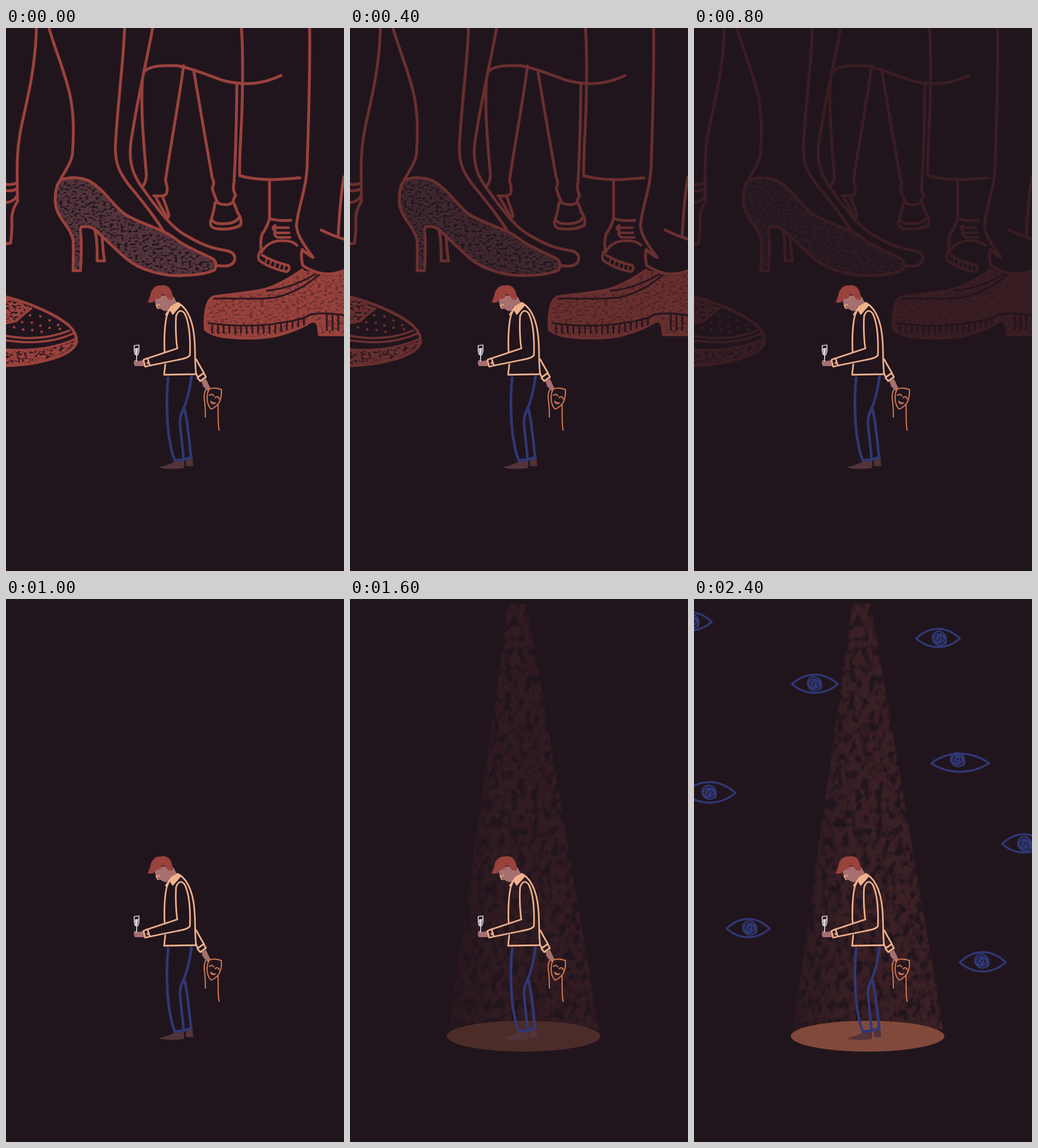
An HTML page that plays this animation: 590 px wide and 949 px high, repeating every 2800 ms.

```html
<!DOCTYPE html>
<html lang="en">
<head>
<meta charset="utf-8">
<title>Alone in the spotlight</title>
<style>
html, body { margin: 0; width: 100%; height: 100%; overflow: hidden; background: #21151d; }
svg { display: block; width: 100%; height: 100%; }
path, g { stroke-linecap: round; stroke-linejoin: round; }
.dark { fill: none; stroke: #2a171e; stroke-width: 3; }
.flat { stroke: none; }
</style>
</head>
<body>
<svg viewBox="0 0 590 949" fill="none">
  <defs>
    <filter id="grain" color-interpolation-filters="sRGB">
      <feTurbulence type="fractalNoise" baseFrequency=".16 .26" numOctaves="3" seed="4"/>
      <feColorMatrix values="0 0 0 0 0  0 0 0 0 0  0 0 0 0 0  6 0 0 0 -2"/>
      <feComposite in="SourceGraphic" operator="in"/>
    </filter>
    <filter id="haze" color-interpolation-filters="sRGB">
      <feTurbulence type="fractalNoise" baseFrequency=".085 .06" numOctaves="3" seed="9"/>
      <feColorMatrix values="0 0 0 0 0  0 0 0 0 0  0 0 0 0 0  4 0 0 0 -1.25" result="n"/>
      <feGaussianBlur in="SourceGraphic" stdDeviation="1.2"/>
      <feComposite in2="n" operator="in"/>
    </filter>
    <linearGradient id="beam">
      <stop offset="0" stop-color="#3a2025" stop-opacity=".5"/>
      <stop offset=".4" stop-color="#3a2025"/>
      <stop offset="1" stop-color="#3c2126"/>
    </linearGradient>
  </defs>

  <g id="crowd" stroke="#9a423c" stroke-width="5">
    <!-- left leg and boot -->
    <path d="M53 0C52 50 45 90 36 130C30 160 22 185 20 225Q19 250 20 303Q10 318 10 335Q11 355 8 376L0 377M0 273Q10 275 18 271M0 284Q10 286 19 281M0 305Q14 304 20 292"/>
    <path d="M75 0C85 35 100 70 110 110C120 150 118 190 116 220C114 235 103 250 95 265"/>
    <!-- second leg -->
    <path d="M207 0C205 60 195 130 191 205C190 240 200 255 215 275C240 305 260 330 278 360M256 0C245 60 228 130 218 200C213 240 225 262 240 282C260 310 285 345 310 360C335 375 355 385 385 389C400 392 402 402 397 410C390 418 380 416 366 415"/>
    <!-- high heel -->
    <path id="heel" class="flat" fill="#55353d" filter="url(#grain)" d="M95 266C110 260 130 260 145 267C175 285 185 310 210 327C240 345 275 350 300 372C320 385 345 395 362 404Q370 412 364 423C345 432 310 434 285 432C255 428 230 420 210 403C185 382 170 365 155 352Q145 345 131 348Q129 352 131 365Q132 395 130 424L117 424Q118 390 117 370C112 345 85 330 86 300Q86 275 95 266Z"/>
    <use href="#heel" id="heelLine"/>
    <path d="M155 354Q160 370 159 407L172 407Q169 390 168 366"/>
    <!-- skirt with two legs -->
    <path d="M240 78C250 65 275 65 300 66C330 72 350 82 380 92C420 102 450 97 480 83M238 92C235 140 240 200 245 255Q245 268 240 275M310 66C303 120 290 190 279 262C276 270 285 275 280 290Q275 295 258 293M274 296Q279 310 284 325Q285 332 281 331Q268 308 262 297"/>
    <path d="M328 76C337 130 350 205 360 262Q365 270 360 280Q366 300 370 306Q385 312 396 305Q398 295 401 293Q395 282 398 270Q402 200 403 96M365 305Q362 325 357 338Q355 350 370 351Q395 353 409 345Q413 335 404 322Q400 310 397 305M360 336Q364 343 380 342Q400 342 406 332"/>
    <!-- long trouser and laced boot -->
    <path d="M411 0C414 40 413 100 412 140C411 180 407 220 408 258Q430 265 470 265Q500 263 513 262L507 262M460 268V333Q475 338 497 336M460 333Q455 350 447 360Q443 375 446 390"/>
    <path stroke-width="4.5" d="M470 349H493M470 358H494M474 366H496M470 345Q462 350 470 354Q466 362 474 366M446 392Q455 375 475 372Q500 370 508 380M445 388Q438 398 442 406Q460 420 490 426Q497 422 493 415Q465 408 447 397"/>
    <path stroke-width="3" d="M455 403L453 410M463 406L461 414M471 409L469 417M479 412L477 420M486 414L485 423"/>
    <!-- brown shoe -->
    <path class="flat" fill="#6b3031" d="M517 423C500 435 480 448 455 456C430 464 385 465 362 470C350 475 346 500 348 527Q360 537 385 540Q430 545 470 538Q510 528 532 513Q542 510 545 520L547 536H590V424Q560 432 517 423Z"/>
    <path id="shoe" class="flat" fill="#9a423c" filter="url(#grain)" d="M517 423C500 435 480 448 455 456C430 464 385 465 362 470C350 475 346 500 348 527Q360 537 385 540Q430 545 470 538Q510 528 532 513Q542 510 545 520L547 536H590V424Q560 432 517 423Z"/>
    <path d="M517 423C500 435 480 448 455 456C430 464 385 465 362 470C350 475 346 500 348 527Q360 537 385 540Q430 545 470 538Q510 528 532 513Q542 510 545 520L547 536H590"/>
    <path class="dark" d="M363 473C410 472 450 475 475 470C510 460 530 445 548 430M455 459Q500 455 540 430M354 516Q430 525 480 515Q520 510 532 500Q560 497 590 502"/>
    <path class="dark" id="treads"/>
    <!-- right leg -->
    <path d="M530 0C531 80 528 170 526 230C526 280 510 310 507 345C508 365 525 385 536 401Q525 395 517 387Q514 400 518 415Q540 430 565 430Q580 428 590 424M590 260Q583 300 580 362M550 353Q570 363 590 369"/>
    <!-- brogue -->
    <path class="flat" fill="#9a423c" filter="url(#grain)" d="M0 470Q25 478 44 490Q30 500 18 512L0 516ZM0 560Q70 570 123 545Q115 570 40 587L0 590Z"/>
    <path d="M0 470C30 478 80 495 110 520Q125 535 123 550C115 570 80 580 40 587Q15 590 0 590"/>
    <path stroke-width="4" d="M44 490Q30 500 18 512L0 516M0 538Q60 549 110 529M0 546Q70 556 117 534M0 562Q70 567 122 543"/>
    <path id="dots" stroke-width="4.5"/>
  </g>

  <path id="cone" fill="url(#beam)" filter="url(#haze)" d="M277 8H308L436 757Q303 715 172 757Z"/>
  <ellipse id="floor" cx="303" cy="764" rx="134" ry="27" fill="#864c3d"/>
  <g id="eyes" stroke="#303875" stroke-width="3.5"></g>

  <!-- man -->
  <g stroke="#303875" stroke-width="4.5">
    <path class="flat" fill="#52333a" d="M269 767Q285 763 294 758L311 756V769Q290 772 270 769ZM314 754L325 750L327 765Q320 767 314 765Z"/>
    <path d="M283 611C279 650 281 700 287 728Q290 745 295 756L311 754L324 750M324 608C320 640 313 660 306 675Q303 682 304 695L310 752M312 667C317 690 320 720 323 750"/>
  </g>
  <g fill="#a66f70">
    <path d="M260 474Q270 462 286 471L293 470L299 482L285 488Q283 497 275 494L263 487Q259 480 260 474Z"/>
    <path d="M241 580L232 582L225 580Q221 584 225 591L241 591Z"/>
    <path d="M341 617L349 613L356 628L354 636L344 626Z"/>
  </g>
  <path fill="#9a423c" d="M247 479Q252 470 253 462Q258 449 270 450Q277 448 283 452Q289 457 290 465Q293 470 290 475L283 474Q275 462 271 467Q272 472 266 473Q259 473 258 479Q252 481 247 479Z"/>
  <g stroke="#f0b28c" stroke-width="2.8">
    <path stroke-width="1.5" d="M262 484Q264 492 267 490M263 485L268 483"/>
    <path d="M303 482C318 492 327 515 329 545C331 570 329 585 332 605L276 606L278 588M281 502C276 520 276 555 277 566M299 560C296 540 296 515 297 503Q303 488 312 499C320 515 322 545 321 572Q318 577 300 580L251 590M248 577L299 560M240 580L247 577L251 590L243 592Z"/>
    <path d="M332 579Q341 595 346 604M331 603L335 610M334 611L345 603L349 610L339 617Z"/>
    <path fill="#f0b28c" stroke-width="1" d="M278 501L287 487L300 479L306 484L291 501L286 493L282 502Z"/>
    <path d="M247 585V586"/>
  </g>
  <path stroke="#d4d2dc" stroke-width="1.7" d="M224 555L232 554Q233 566 230 571Q228 573 225 570Q223 560 224 555ZM228 572V582"/>
  <path fill="#d4d2dc" d="M225 560L231 559L229 571H226Z"/>
  <g stroke="#d77a50" stroke-width="2">
    <path d="M354 631Q365 627 376 632Q377 645 372 655Q365 664 358 666Q351 660 351 645Q352 636 354 631ZM349 631Q344 640 347 655Q348 665 348 680M370 658C371 675 369 690 372 703M355 642Q359 638 363 643M365 646Q370 642 372 648"/>
    <path fill="#d77a50" stroke-width="1.5" d="M357 652Q359 659 366 655Q361 656 357 652Z"/>
  </g>
</svg>
<script>
const $ = id => document.getElementById(id);

// outline of the heel shares the filled shape
$('heelLine').outerHTML = `<path d="${$('heel').getAttribute('d')}"/>`;

let treads = '';
for (let x = 360; x < 590; x += 10) {
  const rise = x < 470 ? 0 : Math.min(18, (x - 470) / 3.5);
  if (x < 528 || x > 550) treads += `M${x} ${520 - rise}v${x > 550 ? 26 : 13}`;
}
$('treads').setAttribute('d', treads);

const dots = [[42, 502], [60, 504], [76, 511], [91, 519], [28, 514], [45, 515],
  [60, 520], [76, 524], [94, 526], [14, 523], [30, 527], [46, 528], [62, 531]];
$('dots').setAttribute('d', dots.map(([x, y]) => `M${x} ${y}h.1`).join(''));

function eye(left, right, y, h, px, py) {
  const w = right - left;
  let d = `M${left} ${y}C${left + w * .3} ${y - h * 1.4} ${right - w * .3} ${y - h * 1.4} ${right} ${y}` +
    `C${right - w * .3} ${y + h * 1.25} ${left + w * .3} ${y + h * 1.25} ${left} ${y}`;
  let spiral = '';
  for (let a = 0; a < 26; a += .3) {
    const r = 1.5 + a * .47 + Math.sin(a * 1.7);
    spiral += `${a ? 'L' : 'M'}${(px + r * Math.cos(a)).toFixed(1)} ${(py + r * Math.sin(a)).toFixed(1)}`;
  }
  return `<path d="${d}"/><path stroke-width="2.7" d="${spiral}"/>`;
}
$('eyes').innerHTML = [
  [-45, 31, 40, 16, -4, 40], [388, 464, 69, 16, 428, 70], [171, 251, 149, 16, 210, 149],
  [414, 515, 287, 16, 460, 282], [-18, 72, 339, 18, 26, 339], [538, 614, 428, 16, 577, 429],
  [57, 132, 576, 16, 97, 576], [464, 544, 635, 17, 502, 634]
].map(e => eye(...e)).join('');

// opacity of each layer per 200 ms step; the last value holds
const fades = {
  crowd: [1, .8, .6, .4, .2, 0],
  cone: [0, 0, 0, 0, 0, 0, .25, .5, .68, .68, .68, .84, 1],
  floor: [0, 0, 0, 0, 0, 0, .14, .28, .42, .65, .88, .92, .96],
  eyes: [0, 0, 0, 0, 0, 0, 0, 0, 0, 0, 0, .5, 1]
};

function draw(now) {
  const step = Math.floor(now % 2800 / 200);
  for (const id in fades) {
    const list = fades[id];
    $(id).setAttribute('opacity', list[Math.min(step, list.length - 1)]);
  }
  requestAnimationFrame(draw);
}
draw(performance.now());
</script>
</body>
</html>
```
